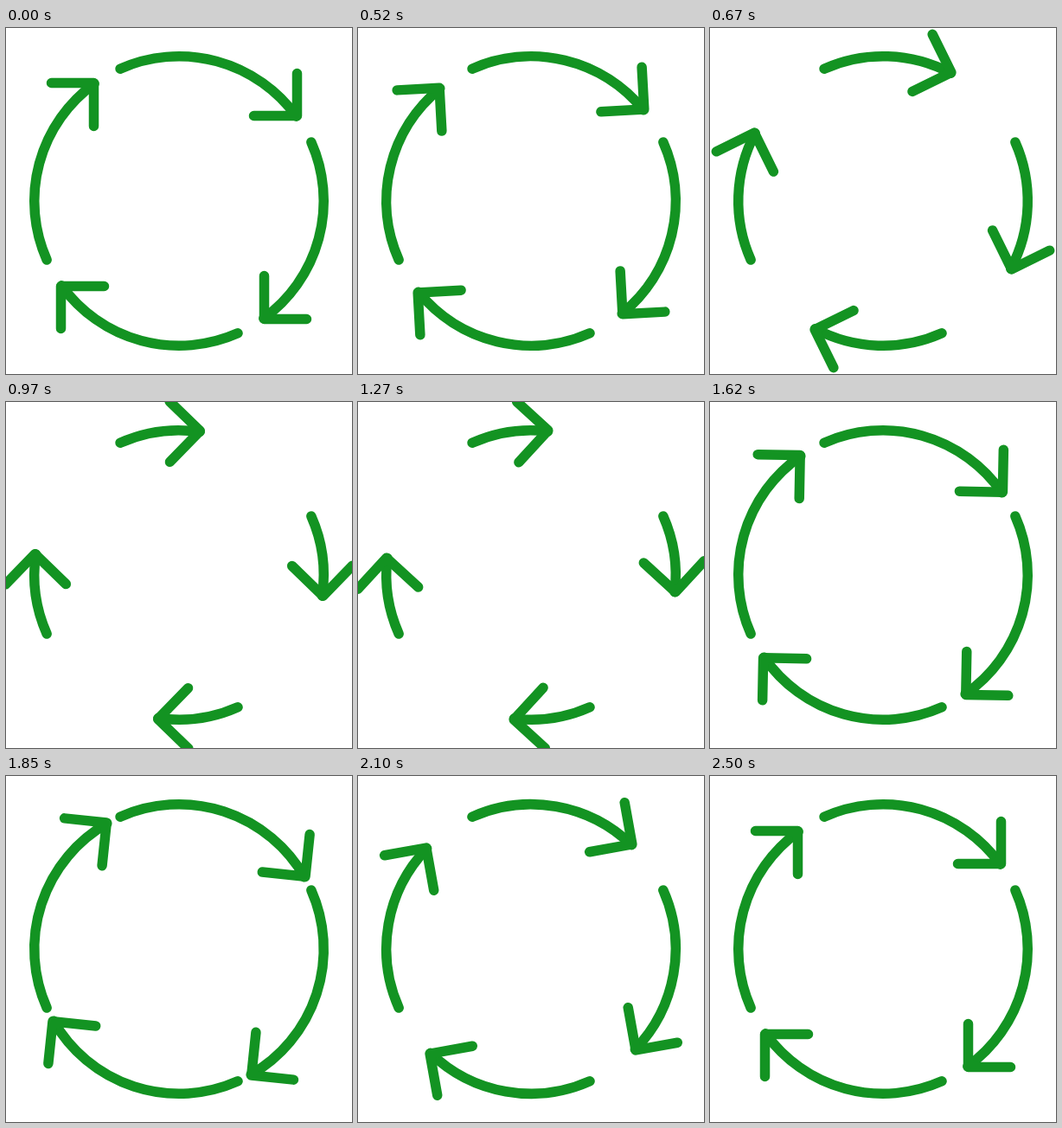
An HTML page without scripts that plays this animation: 400x400 px, repeating every 2.52 s.

```html
<!DOCTYPE html>
<html lang="en">
<head>
<meta charset="utf-8">
<title>Cycle arrows</title>
<style>
  /* Degrees each arrowhead has travelled from its resting place */
  @property --turn {
    syntax: "<number>";
    inherits: true;
    initial-value: 0;
  }

  html, body {
    margin: 0;
    width: 100%;
    height: 100%;
    overflow: hidden;
    background: #fff;
  }

  svg {
    display: block;
    width: 100%;
    height: 100%;
    fill: none;
    stroke: #139322;
    stroke-width: 11.5;
    stroke-linecap: round;
    stroke-linejoin: round;
    animation: swing 2520ms infinite;
  }

  /* The path spans 100 degrees; the dash hides what lies past the head */
  .tail {
    stroke-dasharray: 100 360;
    stroke-dashoffset: calc(21.8 - var(--turn));
  }

  .head {
    transform-origin: 200px 200px;
    transform: rotate(calc(var(--turn) * 1deg));
  }

  @keyframes swing {
    0% { --turn: 0; }
    20.04% { --turn: 0; animation-timing-function: cubic-bezier(.33, 1, .68, 1); }
    48.41% { --turn: -48; animation-timing-function: cubic-bezier(.6, 0, .6, 1); }
    69.25% { --turn: 9.8; animation-timing-function: ease-in-out; }
    83.13% { --turn: -10.2; animation-timing-function: ease-in-out; }
    99.01%, 100% { --turn: 0; }
  }
</style>
</head>
<body>
<svg viewBox="0 0 400 400">
  <defs>
    <g id="arrow">
      <path class="tail" pathLength="100" d="M131.95 47.2A167.3 167.3 0 0 1 362.3 159.5"/>
      <path class="head" d="M336.5 52.5V101.5H286.5"/>
    </g>
  </defs>
  <use href="#arrow"/>
  <use href="#arrow" transform="rotate(90 200 200)"/>
  <use href="#arrow" transform="rotate(180 200 200)"/>
  <use href="#arrow" transform="rotate(270 200 200)"/>
</svg>
</body>
</html>
```
